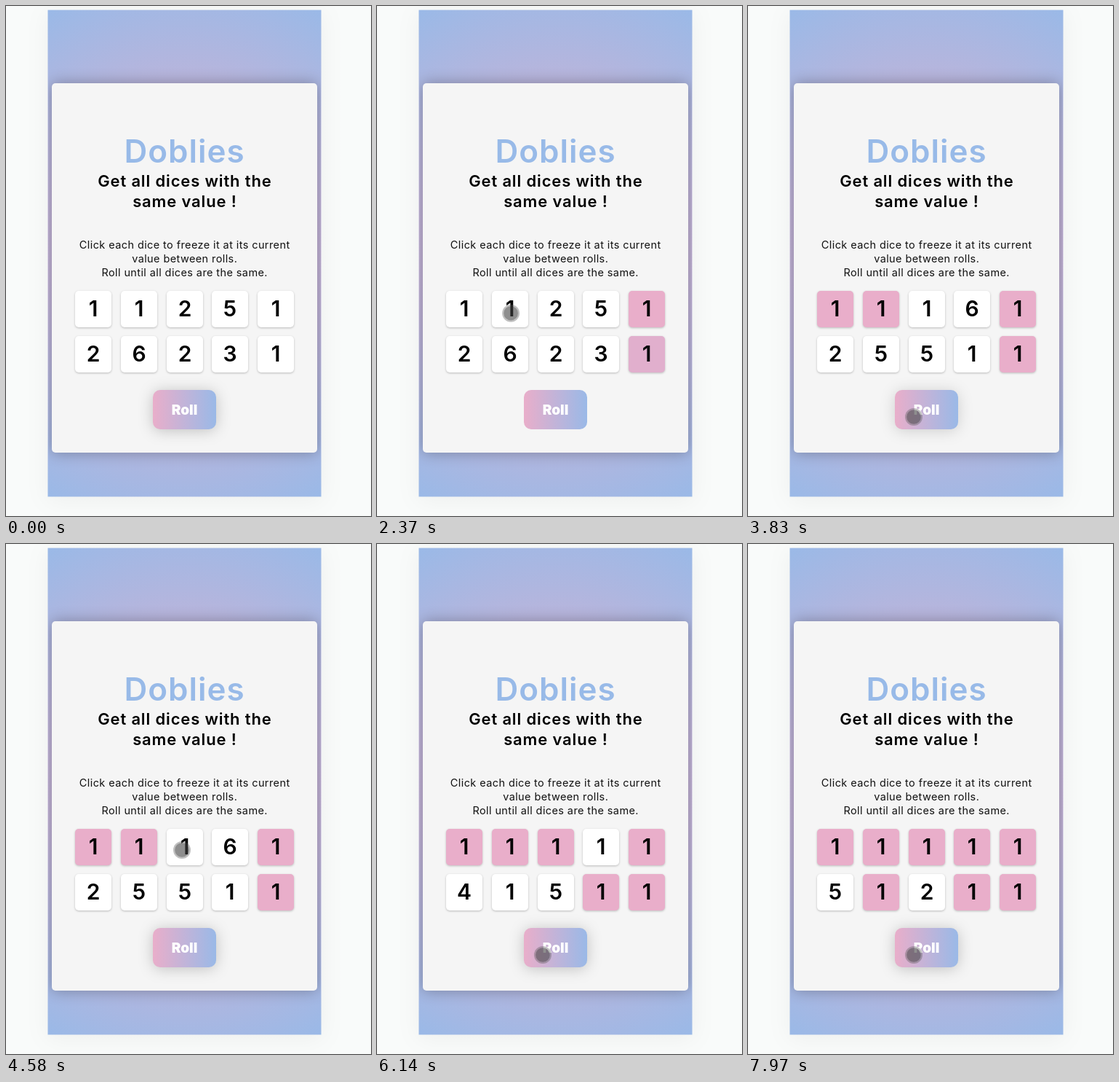
An HTML page with a canvas that plays this animation: 502x700 px, repeating every 8000 ms.

```html
<!DOCTYPE html>
<html lang="en">
<head>
<meta charset="utf-8">
<title>Dice game</title>
<style>
  html, body { margin: 0; width: 100%; height: 100%; overflow: hidden; background: #f9fbfa; }
  canvas { display: block; width: 502px; height: 700px; }
</style>
</head>
<body>
<canvas id="stage" width="502" height="700"></canvas>
<script>
const ctx = document.getElementById('stage').getContext('2d');
const FONT = 'Inter, "Open Sans", sans-serif';
const LOOP = 8000, FADE = 500, PRESS = 130, ROLL_PAUSE = 350;
const BLUE = [154, 185, 231], PINK = [233, 174, 202];
const INK = [60, 90, 115], BLACK = [0, 0, 0];

// The player's clicks in order: a die index, or the faces a roll brings up
const clicks = [
  [1600, 4], [1920, 9], [2640, 0 + 1], [3140, 0], [3830, '1116125511'],
  [4720, 2], [5210, 8], [5810, '1111141511'],
  [6700, 3], [7150, 6], [7900, '1111151211'],
].map(([t, what]) => ({ t, what, roll: typeof what === 'string' }));
const START = '1125126231';

const clamp = v => Math.min(1, Math.max(0, v));
const mix = (a, b, k) => a + (b - a) * k;
const rgb = c => `rgb(${c.map(Math.round)})`;
const blend = (a, b, k) => rgb(a.map((v, i) => mix(v, b[i], k)));
const dieAt = i => ({ x: Math.round(95 + (i % 5) * 62.75), y: i < 5 ? 391 : 453 });

function box(x, y, w, h, r, fill, shadow) {
  ctx.save();
  if (shadow) [ctx.shadowColor, ctx.shadowOffsetY, ctx.shadowBlur] = shadow;
  ctx.fillStyle = fill;
  ctx.beginPath();
  ctx.roundRect(x, y, w, h, r);
  ctx.fill();
  ctx.restore();
}

function text(str, x, y, size, weight, fill, spacing = 0) {
  ctx.font = `${weight} ${size}px ${FONT}`;
  ctx.letterSpacing = spacing + 'px';
  ctx.textAlign = 'center';
  ctx.fillStyle = fill;
  ctx.fillText(str, x + spacing / 2, y);
}

function pinkToBlue(gradient) {
  gradient.addColorStop(0, rgb(PINK));
  gradient.addColorStop(1, rgb(BLUE));
  return gradient;
}

function drawPage() {
  ctx.fillStyle = '#f9fbfa';
  ctx.fillRect(0, 0, 502, 700);
  const back = pinkToBlue(ctx.createRadialGradient(245.5, 339.5, 0, 245.5, 339.5, 382.6));
  box(57.5, 5.5, 376, 668, 0, back, ['rgba(0,0,0,.05)', 4, 30]);
  ctx.save();
  ctx.beginPath();
  ctx.rect(58, 6, 375, 667);
  ctx.clip();
  box(63, 106, 365, 507, 5, '#f5f5f5', ['rgba(0,0,0,.3)', 0, 20]);
  ctx.restore();

  text('Doblies', 245, 215, 44, 600, '#98bae8', 1);
  ['Get all dices with the', 'same value !'].forEach((line, i) =>
    text(line, 245.5, 248 + i * 28, 22, 600, '#000', 0.85));
  ['Click each dice to freeze it at its current', 'value between rolls.',
    'Roll until all dices are the same.'].forEach((line, i) =>
    text(line, 245.5, 333 + i * 19, 14.5, 400, '#111', 0.4));
}

function drawDice(past, t) {
  const lastRoll = past.findLast(c => c.roll);
  [...(lastRoll ? lastRoll.what : START)].forEach((face, i) => {
    const { x, y } = dieAt(i);
    const freeze = past.find(c => c.what === i);
    const k = freeze ? clamp((t - freeze.t) / FADE) : 0;
    box(x, y, 50, 50, 5, freeze ? blend(BLUE, PINK, k) : '#fff', ['rgba(0,0,0,.24)', 1, 3]);
    text(face, x + 25, y + 35, 30, 600, freeze ? blend(INK, BLACK, k) : '#000');
  });
}

// The button glows while it has the focus, which each press moves
function drawButton(t) {
  const focus = clicks.reduce((level, c) =>
    mix(level, c.roll ? 1 : 0, clamp((t - c.t + PRESS - 20) / 150)), 1);
  const fill = pinkToBlue(ctx.createLinearGradient(202, 0, 289, 0));
  box(202, 527, 87, 54, 10, fill, focus > 0 && [`rgba(0,0,0,${0.22 * focus})`, 2, 20]);
  text('Roll', 245.5, 561, 19, 900, '#fff');
}

function spot(click) {
  if (!click) return { x: 374, y: 712 };
  if (click.roll) return { x: 228, y: 564 };
  const { x, y } = dieAt(click.what);
  return { x: x + 21, y: y + 29 };
}

// Moves swiftly to the next spot, slows down and presses there
function drawPointer(past, t) {
  const last = past[past.length - 1], next = clicks[past.length] || last;
  const leave = last ? last.t + (last.roll ? ROLL_PAUSE : 0) : 860;
  if (t < leave && !last) return;
  const u = clamp((t - leave) / (0.75 * (next.t - leave)));
  const k = next === last ? 1 : u * (2 - u);
  const a = spot(last), b = spot(next);
  const down = t < next.t && t >= next.t - PRESS;
  const disc = (r, fill) => {
    ctx.fillStyle = fill;
    ctx.beginPath();
    ctx.arc(mix(a.x, b.x, k), mix(a.y, b.y, k), r, 0, 7);
    ctx.fill();
  };
  disc(12, down ? 'rgba(205,215,40,.65)' : 'rgba(90,90,90,.38)');
  disc(9.8, down ? 'rgba(165,160,0,.42)' : 'rgba(50,50,50,.35)');
}

function frame(now) {
  const t = now % LOOP;
  const past = clicks.filter(c => c.t <= t);
  drawPage();
  drawDice(past, t);
  drawButton(t);
  drawPointer(past, t);
  requestAnimationFrame(frame);
}
requestAnimationFrame(frame);
</script>
</body>
</html>
```
